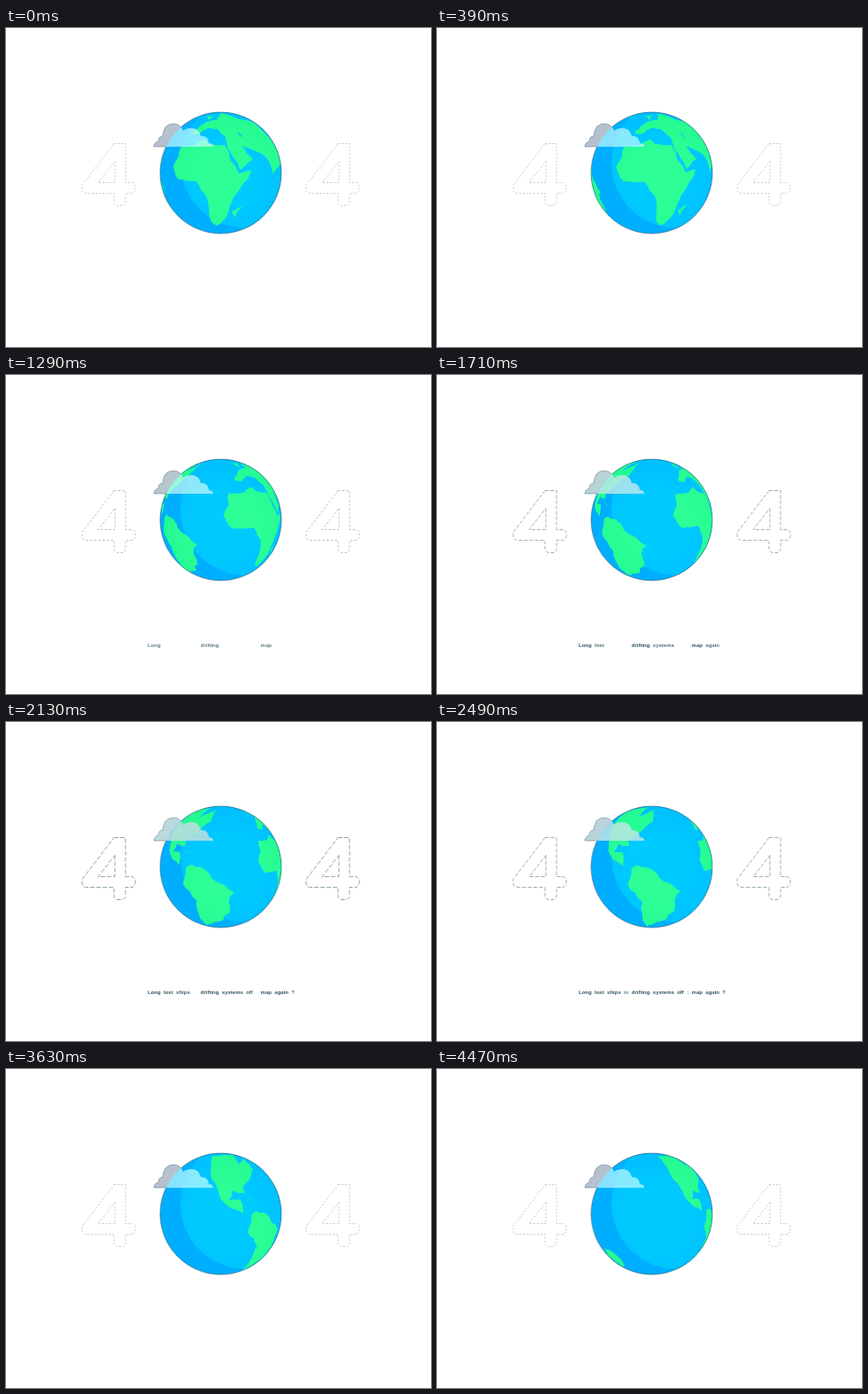
Write an HTML page with a canvas that moves like this. It is 480 px wide and 360 px high and loops after 4.5 s.

```html
<!DOCTYPE html>
<html lang="en">
<meta charset="utf-8">
<title>404 globe</title>
<style>
  html, body { margin: 0; width: 100%; height: 100%; overflow: hidden; background: #fff; }
  canvas { display: block; }
</style>
<canvas id="stage" width="480" height="360"></canvas>
<script>
const ctx = document.getElementById('stage').getContext('2d');
const LOOP = 4500, TAU = Math.PI * 2;
const CX = 242.5, CY = 163.5, R = 68.5;
const DIST = 2.5, LENS = R * Math.sqrt(DIST * DIST - 1);
const TILT = 10 * Math.PI / 180, COS = Math.cos(TILT), SIN = Math.sin(TILT);
const turn = t => t / 12300 * TAU;

let seed = 7;
const random = () => (seed = seed * 16807 % 2147483647) / 2147483647;

// Screen point at time t -> [longitude, height] on the unit sphere
function unproject([px, py], t) {
  let x = px - CX, y = CY - py;
  const fit = Math.min(1, .998 * R / Math.hypot(x, y));
  x *= fit; y *= fit;
  const a = x / LENS, b = y / LENS, q = a * a + b * b;
  const s = (DIST - Math.sqrt(1 - (x * x + y * y) / (R * R))) / (1 + q);
  const X = a * s, Y = b * s, Z = DIST - s;
  return [Math.atan2(X, Z * COS - Y * SIN) - turn(t), Y * COS + Z * SIN];
}

// Points beyond the horizon are pushed just outside the disc
function project([lon, h], t) {
  const ring = Math.sqrt(1 - h * h), angle = lon + turn(t);
  const X = ring * Math.sin(angle), z = ring * Math.cos(angle);
  const Y = h * COS - z * SIN, Z = z * COS + h * SIN;
  const hidden = Z < 1 / DIST;
  const scale = hidden ? R * (1 + 1 / DIST - Z) / Math.hypot(X, Y) : LENS / (DIST - Z);
  return { x: CX + X * scale, y: CY - Y * scale, hidden };
}

// Splits every edge at a randomly displaced midpoint
function roughen(points) {
  return points.flatMap(([x, y], i) => {
    const [nx, ny] = points[(i + 1) % points.length];
    const push = (random() - .5) * .22;
    return [[x, y], [(x + nx) / 2 + (ny - y) * push, (y + ny) / 2 - (nx - x) * push]];
  });
}

// Key points of a coast, as it stands on the disc at time t
function land(t, ...xy) {
  const points = [];
  for (let i = 0; i < xy.length; i += 2) points.push([xy[i], xy[i + 1]]);
  return roughen(roughen(points)).map(p => unproject(p, t));
}

const africa = land(0, 198,134, 224,126, 229,131, 247,132, 263,164, 277,161, 257,191,
  250,211, 238,223, 232,219, 227,192, 215,173, 195,171, 189,156);
const madagascar = land(0, 267,201, 258,215, 255,207);
const eurasia = land(0, 243,96, 280,106, 306,137, 310,152, 302,165, 292,144, 266,133,
  279,149, 264,160, 250,135, 247,122, 238,114, 229,113, 217,120, 210,119, 222,109, 238,104);
const scandinavia = land(0, 226,99, 238,97, 229,104);
const caspian = land(0, 260,111, 267,124, 262,119);
const southAmerica = land(2880, 240,165, 247,162, 268,170, 274,178, 290,188, 281,211,
  260,225, 248,231, 251,203, 235,186);
const caribbean = land(2880, 235,145, 247,149, 241,148);
const northAmerica = land(3630, 233,98, 256,97, 263,108, 268,101, 279,114, 275,125, 267,134,
  270,140, 256,137, 252,148, 264,147, 268,163, 242,146, 232,124);
const australia = land(4470, 188,202, 200,208, 212,223, 202,218);
const LANDS = [africa, madagascar, eurasia, scandinavia, caspian, southAmerica, caribbean,
  northAmerica, australia];

const disc = new Path2D();
disc.arc(CX, CY, R, 0, TAU);
const outside = new Path2D(disc);
outside.rect(0, 0, 480, 360);
const cloud = new Path2D('M167 134q0-5 5-6q0-6 5-6q1-14 12-14q8 0 11 8q3-3 9-3'
  + 'q9 0 11 9q8-1 9 8q5 0 5 4z');
const four = new Path2D('M122 130H135V174H143L146 177V183L143 186H135V197L132 200'
  + 'H125L122 197V186H91Q86 186 86 181V177ZM123 150V174H104Z');

function radial(x, y, r, inner, outer) {
  const g = ctx.createRadialGradient(x, y, 0, x, y, r);
  g.addColorStop(.4, inner);
  g.addColorStop(1, outer);
  return g;
}
const sea = radial(248, 168, 82, '#00cbff', '#00bcff');
const ground = radial(250, 170, 80, '#2dff96', '#22fa91');

function clipped(area, paint) {
  ctx.save();
  ctx.clip(area, 'evenodd');
  paint();
  ctx.restore();
}

function drawGlobe(t) {
  clipped(disc, () => {
    ctx.fillStyle = '#00aeff';
    ctx.fill(disc);
    ctx.fillStyle = sea;
    ctx.beginPath();
    ctx.arc(271, 152, 74, 0, TAU);
    ctx.fill();
    ctx.beginPath();
    for (const points of LANDS) {
      const shape = points.map(p => project(p, t));
      if (shape.every(p => p.hidden)) continue;
      shape.forEach((p, i) => i ? ctx.lineTo(p.x, p.y) : ctx.moveTo(p.x, p.y));
      ctx.closePath();
    }
    ctx.fillStyle = ground;
    ctx.fill('evenodd');
  });
  ctx.lineWidth = .8;
  ctx.strokeStyle = 'rgba(25,70,95,.65)';
  ctx.stroke(disc);
}

function drawCloud(glow) {
  clipped(outside, () => {
    ctx.fillStyle = `rgb(${181 + 5 * glow},${193 + 25 * glow},${206 + 16 * glow})`;
    ctx.fill(cloud);
    ctx.lineWidth = .6;
    ctx.strokeStyle = 'rgba(50,70,80,.6)';
    ctx.stroke(cloud);
  });
  clipped(disc, () => {
    ctx.fillStyle = `rgba(${205 - 15 * glow},${255 - 32 * glow},${255 - 30 * glow},${.66 + .2 * glow})`;
    ctx.fill(cloud);
  });
}

function drawFours(glow) {
  ctx.strokeStyle = `rgba(30,75,90,${.4 + .3 * glow})`;
  ctx.lineWidth = .7;
  ctx.setLineDash([2 + 3 * glow, 2]);
  for (const shift of [0, 253]) {
    ctx.save();
    ctx.translate(shift, .5);
    ctx.stroke(four);
    ctx.restore();
  }
  ctx.setLineDash([]);
}

// Words fade in one group after another and leave together
const WORDS = 'Long lost ships in drifting systems off : map again ?'.split(' ');
function drawText(t) {
  ctx.font = 'bold 6px "Liberation Sans", Arial, sans-serif';
  ctx.fillStyle = '#123c4a';
  const widths = WORDS.map(word => ctx.measureText(word).width);
  const gap = (166 - widths.reduce((a, b) => a + b)) / (WORDS.length - 1);
  let x = 160;
  WORDS.forEach((word, i) => {
    const start = 1100 + i % 4 * 400;
    ctx.globalAlpha = .85 * Math.max(0, Math.min(1, (t - start) / 250, (3450 - t) / 250));
    ctx.fillText(word, x, 307);
    x += widths[i] + gap;
  });
  ctx.globalAlpha = 1;
}

function draw(now) {
  const t = now % LOOP;
  const glow = Math.exp(-(((t - 2150) / 700) ** 2));
  ctx.fillStyle = '#fff';
  ctx.fillRect(0, 0, 480, 360);
  drawFours(glow);
  drawGlobe(t);
  drawCloud(glow);
  drawText(t);
  requestAnimationFrame(draw);
}
requestAnimationFrame(draw);
</script>
</html>
```
